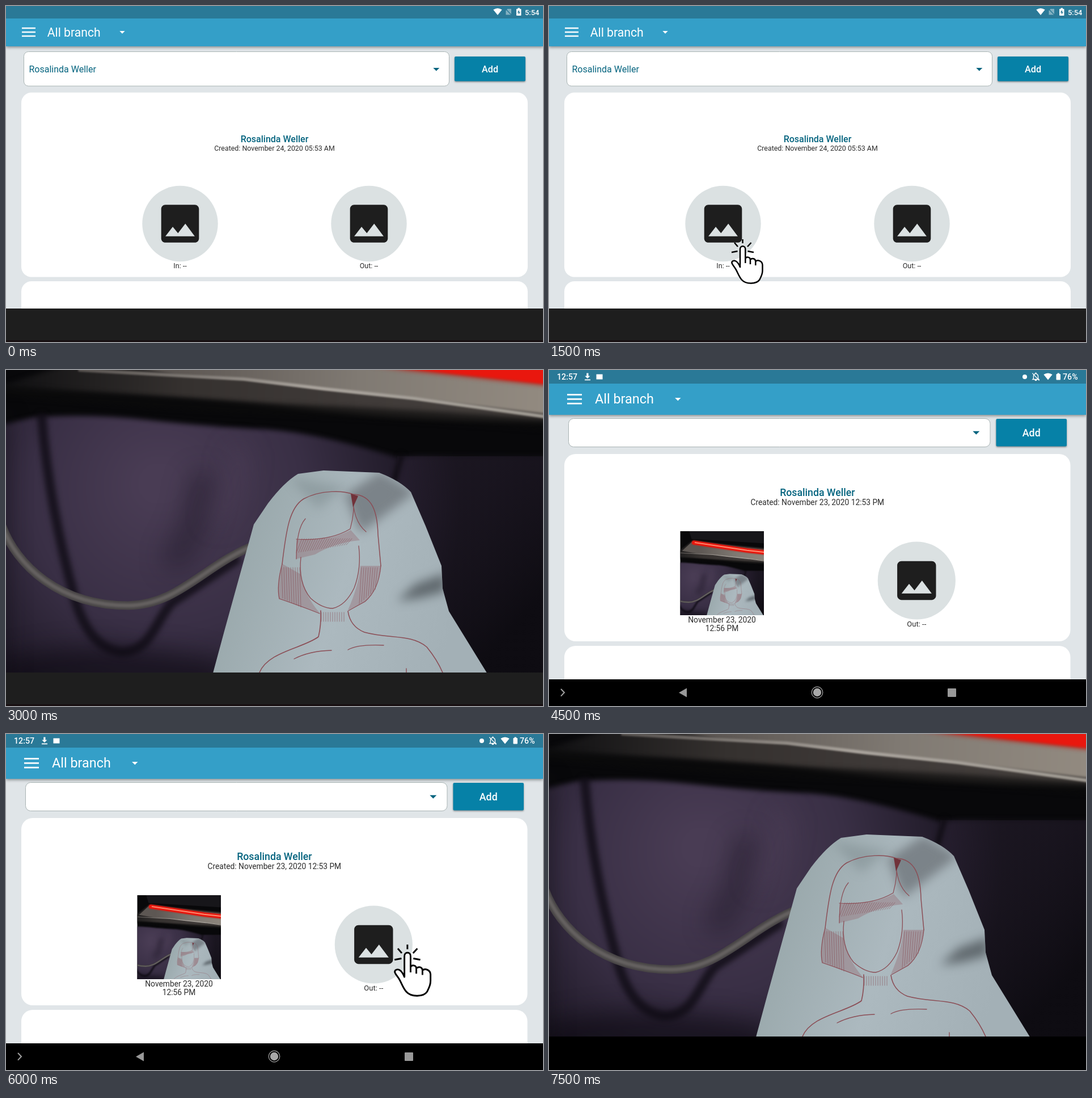
An HTML page with a canvas that plays this animation: 947x592 px, repeating every 8000 ms.

```html
<!DOCTYPE html>
<html lang="en">
<head>
<meta charset="utf-8">
<title>Branch check-in</title>
<style>
html, body { margin: 0; width: 100%; height: 100%; overflow: hidden; background: #000; }
canvas { display: block; width: 947px; height: 592px; }
</style>
</head>
<body>
<canvas id="stage" width="947" height="592"></canvas>
<script>
const W = 947, H = 592, LOOP = 8000, STEP = 1500;
const ctx = document.getElementById('stage').getContext('2d');
const PERSON = 'Rosalinda Weller';
const INK = '#2c2c2c', TEAL = '#05647f', DARK = '#1e1e1e';

const pictureIcon = new Path2D('M21 19V5c0-1.1-.9-2-2-2H5c-1.1 0-2 .9-2 2v14c0 1.1.9 2 2 2h14c1.1 0 2-.9 2-2zM8.5 13.5l2.5 3.01L14.5 12l4.5 6H5l3.5-4.5z');
const handShape = new Path2D('M16 49V17.5C16 10.5 25.3 10.5 25.3 17.5V34C27 30 33.8 31 34 36C37 32.5 43 34 43.3 39C47 35.5 55 38 55.5 45V55C55.5 63 52 67 50.5 71C45 79.5 26 79.5 19 71.5C14 66 12 59 8.5 53C6 48.5 3 46 1.5 42C.8 38.5 5 36.5 8.5 38.5C12 40.5 14 44 16 49Z');
const handLines = new Path2D('M25.3 33V42M34 36V44M43.3 39V46M20.5 0V7M6 6L12 13M35.5 6L29 13M1 23L11.5 21M29.5 21L40 23');
const bellIcon = new Path2D('M12 22c1.1 0 2-.9 2-2h-4a2 2 0 0 0 2 2zM6 17V11c0-3 1.6-5.6 4.5-6.3V4a1.5 1.5 0 0 1 3 0v.7C16.4 5.4 18 8 18 11v6l2 2H4z');

function rect(x, y, w, h, fill) {
  ctx.fillStyle = fill;
  ctx.fillRect(x, y, w, h);
}

function round(x, y, w, h, r, fill, stroke) {
  ctx.beginPath();
  ctx.roundRect(x, y, w, h, r);
  ctx.fillStyle = fill;
  ctx.fill();
  if (stroke) {
    ctx.strokeStyle = stroke;
    ctx.lineWidth = 1;
    ctx.stroke();
  }
}

function disc(x, y, r, fill) {
  ctx.beginPath();
  ctx.arc(x, y, r, 0, Math.PI * 2);
  ctx.fillStyle = fill;
  ctx.fill();
}

function fillPath(d, fill) {
  ctx.fillStyle = fill;
  ctx.fill(new Path2D(d));
}

function strokePath(d, color, width) {
  ctx.strokeStyle = color;
  ctx.lineWidth = width;
  ctx.stroke(new Path2D(d));
}

function text(str, x, y, size, color, weight = 400, align = 'left') {
  ctx.font = `${weight} ${size}px Roboto, sans-serif`;
  ctx.textAlign = align;
  ctx.fillStyle = color;
  ctx.fillText(str, x, y);
}

function caret(x, y, w, color) {
  fillPath(`M${x - w / 2} ${y}h${w}l${-w / 2} ${w / 2}z`, color);
}

function withShadow(blur, dy, alpha, draw) {
  ctx.save();
  ctx.shadowColor = `rgba(0,0,0,${alpha})`;
  ctx.shadowBlur = blur;
  ctx.shadowOffsetY = dy;
  draw();
  ctx.restore();
}

function gradient(x0, y0, x1, y1, ...colors) {
  const g = ctx.createLinearGradient(x0, y0, x1, y1);
  colors.forEach((c, i) => g.addColorStop(i / (colors.length - 1), c));
  return g;
}

function wifi(x, y) {
  fillPath(`M${x - 7.7} ${y - 3.6}Q${x} ${y - 8.6} ${x + 7.7} ${y - 3.6}L${x} ${y + 6}z`, '#fff');
}

function placeholder(x, y, r, scale) {
  disc(x, y, r, '#dbe1e2');
  ctx.save();
  ctx.translate(x, y);
  ctx.scale(scale, scale);
  ctx.translate(-12, -12);
  ctx.fillStyle = DARK;
  ctx.fill(pictureIcon, 'evenodd');
  ctx.restore();
}

function hand(x, y, scale) {
  ctx.save();
  ctx.translate(x, y);
  ctx.scale(scale, scale);
  ctx.lineWidth = 2.5;
  ctx.lineCap = 'butt';
  ctx.lineJoin = 'round';
  ctx.strokeStyle = '#000';
  ctx.fillStyle = '#fff';
  ctx.fill(handShape);
  ctx.stroke(handShape);
  ctx.stroke(handLines);
  ctx.restore();
}

function chrome(bar, tool, menu, title, pick) {
  rect(0, 0, W, H, '#e0e5e8');
  withShadow(5, 2, .4, () => rect(0, bar, W, tool - bar, '#349fc8'));
  rect(0, 0, W, bar, '#2a7997');
  for (let i = -1; i < 2; i++)
    rect(menu.x, menu.y + i * menu.gap - menu.h / 2, menu.w, menu.h, '#fff');
  text('All branch', title.x, title.y, title.size, '#fff');
  caret(pick.x, pick.y, pick.w, '#fff');
}

function addButton(x, y, w, h, size, base) {
  withShadow(3, 1.5, .4, () => round(x, y, w, h, 2, '#0681a7'));
  text('Add', x + w / 2, base, size, '#fff', 500, 'center');
}

function emptyScreen() {
  chrome(22, 71, { x: 28, y: 46, gap: 7, w: 24, h: 2.4 }, { x: 72.7, y: 53.5, size: 21.2 }, { x: 205, y: 44, w: 9.4 });
  wifi(867, 10);
  ctx.save();
  ctx.globalAlpha = .42;
  fillPath('M884.5 5H891V15.5H881.5V8z', '#fff');
  ctx.restore();
  strokePath('M880.5 4.5L892 16.5', '#2a7997', 1.5);
  round(900, 5, 8.5, 12, 1, '#fff');
  rect(902.5, 3.5, 3.5, 2, '#fff');
  fillPath('M905 7l-3.3 4.6h2.2V15l3-4.6h-2z', '#2a7997');
  text('5:54', 915, 16, 12.9, '#fff', 500);

  round(31.5, 80.5, 750, 60.5, 8, '#fff', '#a9b4b4');
  text(PERSON, 40.5, 116.6, 16, TEAL);
  caret(758.8, 109, 11, TEAL);
  addButton(791, 89, 125, 43.5, 16.2, 116.7);

  round(27, 152.5, 893, 325, 18, '#fff');
  round(27, 485, 893, 100, 18, '#fff');
  text(PERSON, 473.5, 239.7, 16, TEAL, 500, 'center');
  text('Created: November 24, 2020 05:53 AM', 473.5, 255.3, 12.42, INK, 400, 'center');
  placeholder(307, 383.5, 66.7, 3.7);
  placeholder(640, 383.5, 66.7, 3.7);
  text('In: --', 307, 462, 12.5, INK, 400, 'center');
  text('Out: --', 640, 462, 12.5, INK, 400, 'center');
  bottomBar();
}

function bottomBar() {
  rect(0, 533, W, 59, DARK);
  rect(0, 589, W, 3, '#170f11');
}

function filledScreen() {
  chrome(24, 79, { x: 32, y: 51.3, gap: 7.8, w: 26, h: 2.7 }, { x: 81, y: 59.4, size: 23.4 }, { x: 227.3, y: 49, w: 10.4 });
  text('12:57', 14, 17.2, 14.2, '#fff', 500);
  fillPath('M66.3 5.5h3.2v5h3L67.9 15l-4.6-4.5h3zM63 16.5h10v1.7H63z', '#fff');
  rect(83.5, 7.5, 11, 9, '#fff');
  disc(839, 12, 4, '#fff');
  ctx.save();
  ctx.translate(850.3, 3.6);
  ctx.scale(.68, .68);
  ctx.lineWidth = 2;
  ctx.strokeStyle = '#fff';
  ctx.stroke(bellIcon);
  strokePath('M3 3L21 22', '#fff', 2);
  ctx.restore();
  wifi(880, 11.5);
  round(894.5, 7, 7.5, 10.5, 1, '#fff');
  rect(896.5, 5.5, 3.5, 2, '#fff');
  text('76%', 906, 17.2, 14.2, '#fff', 500);

  round(34.5, 85.5, 743.5, 50, 9, '#fff', '#a9b4b4');
  caret(753.3, 107.7, 12, TEAL);
  addButton(788.5, 86, 124.5, 48.5, 17.8, 117.1);

  round(27, 148, 892.5, 330, 20, '#fff');
  round(27, 486, 892.5, 100, 20, '#fff');
  text(PERSON, 473.3, 222, 17.7, TEAL, 500, 'center');
  text('Created: November 23, 2020 12:53 PM', 473.3, 238.4, 13.78, INK, 400, 'center');
  thumbnail();
  text('November 23, 2020', 305, 444.7, 13.8, INK, 400, 'center');
  text('12:56 PM', 305, 460.3, 13.8, INK, 400, 'center');
  placeholder(648.3, 371, 68.6, 3.8);
  text('Out: --', 648.3, 452, 13, INK, 400, 'center');
  navBar();
}

function navBar() {
  rect(0, 545, W, 47, '#000');
  strokePath('M21 562l6 6.3l-6 6.3', '#a0a0a0', 2);
  fillPath('M229 568.5L243 560.5V576.5z', '#999');
  disc(473, 568, 7.2, '#a8a8a8');
  ctx.beginPath();
  ctx.arc(473, 568, 9.8, 0, Math.PI * 2);
  ctx.strokeStyle = '#a8a8a8';
  ctx.lineWidth = 1.2;
  ctx.stroke();
  round(703, 561, 15, 15, 1, '#999');
}

function soft(px, draw) {
  ctx.save();
  ctx.filter = `blur(${px}px)`;
  draw();
  ctx.restore();
}

// Simplified photo; k is the scale, so that blur radii shrink with it.
function photo(k) {
  ctx.save();
  ctx.lineCap = 'round';
  rect(-10, -200, 970, 740, '#08080a');
  cloth(k);
  wall(k);
  const wire = 'M-8 272C18 345 95 415 215 415C300 414 345 350 428 313';
  strokePath(wire, '#464344', 15);
  soft(2 * k, () => strokePath(wire, '#686463', 7));
  sheet(k);
  ctx.restore();
}

function cloth(k) {
  const tone = ctx.createRadialGradient(270, 200, 30, 300, 240, 500);
  tone.addColorStop(0, '#493c54');
  tone.addColorStop(.45, '#392f45');
  tone.addColorStop(.8, '#211b29');
  tone.addColorStop(1, '#121016');
  soft(4 * k, () => fillPath('M-20 100L45 84Q140 76 250 88T450 104T690 154L730 151L960 152V555H-20z', tone));
  rect(690, 152, 260, 390, gradient(690, 150, 947, 400, 'rgba(48,37,58,.3)', 'rgba(12,10,16,.7)'));
  soft(22 * k, () => {
    strokePath('M345 200Q340 270 300 330', 'rgba(20,15,28,.38)', 46);
    strokePath('M410 150Q410 210 375 255', 'rgba(88,72,98,.3)', 36);
    strokePath('M-20 550Q150 500 360 545', 'rgba(12,9,17,.6)', 70);
    strokePath('M-20 100V540', 'rgba(12,10,16,.5)', 40);
  });
  soft(5 * k, () => {
    strokePath('M63 84Q76 240 122 405Q148 492 205 497C255 495 262 445 292 410T405 335', 'rgba(15,12,20,.8)', 17);
    strokePath('M697 152L685 195', '#0a080c', 7);
  });
}

function wall(k) {
  soft(4 * k, () => {
    fillPath('M-10 28L140 -20L240 -95L960 -25V92Q700 88 500 66T-10 35z', gradient(0, 0, 947, 40, '#101012', '#35312f', '#403b39', '#45403d'));
    strokePath('M-10 36Q300 62 500 70T960 96', 'rgba(12,11,12,.65)', 20);
  });
  soft(2 * k, () => fillPath('M160 -15L240 -88L960 -10V78L720 50L560 33L420 16L300 8z', gradient(300, 0, 947, 30, '#5d5753', '#807a73', '#928a80')));
  soft(1.5 * k, () => strokePath('M130 0L310 10L420 16L560 33L720 50L950 82', gradient(130, 0, 947, 60, '#585350', '#aaa49d', '#9f9a92'), 6));
  soft(4 * k, () => strokePath('M260 -85L705 -19L960 9', '#b52a20', 38));
  soft(2 * k, () => {
    strokePath('M260 -85L705 -19L960 9', '#e9170e', 33);
    if (k < 1) strokePath('M270 -85L705 -20L960 8', '#ff8d72', 9);
  });
  soft(3 * k, () => fillPath('M220 -180H960V-72L240 -116z', '#17161a'));
}

function sheet(k) {
  const paper = new Path2D('M362 545L385 460L421 330L437 272L462 235Q490 198 515 183L560 177L658 181Q695 195 714 215L740 275L768 345L770 385L781 425L855 545z');
  ctx.fillStyle = gradient(400, 290, 800, 420, '#98a7aa', '#acb9bf', '#a3b0b6');
  ctx.fill(paper);
  ctx.save();
  ctx.clip(paper);
  soft(9 * k, () => {
    fillPath('M500 190L600 205L550 245z', 'rgba(105,115,120,.3)');
    fillPath('M598 220L625 288L722 215L660 178z', 'rgba(84,88,94,.55)');
    fillPath('M690 407L722 377L775 358V390L730 402z', 'rgba(60,66,72,.65)');
  });
  ctx.restore();
  sketch();
}

function hatch(x0, x1, y0, y1, slant, bow = 0) {
  for (let x = x0; x <= x1; x += 4) {
    const end = y1 + bow * (x - x0) / (x1 - x0);
    strokePath(`M${x} ${y0}L${x + slant} ${end}`, 'rgba(130,66,74,.5)', 1);
  }
}

// Faceless outline of the drawn figure.
function sketch() {
  const pen = '#8b4d55', wash = 'rgba(142,88,96,.32)';
  fillPath('M488 342Q478 380 482 403Q515 416 553 428Q525 395 520 360z', wash);
  fillPath('M625 345L661 345Q655 385 634 408L603 423Q622 380 625 345z', wash);
  fillPath('M512 298Q565 304 608 282L624 300Q580 304 545 325L512 333z', wash);
  hatch(486, 518, 348, 402, 2, 16);
  hatch(627, 655, 348, 412, -4, -25);
  hatch(556, 598, 427, 443, 0);
  hatch(522, 610, 297, 322, -10, -14);
  strokePath('M487 342C494 282 500 242 525 227C555 211 595 212 612 219C646 220 655 250 656 290L661 345', pen, 1.5);
  strokePath('M487 342Q477 380 482 403Q515 414 553 429M661 345Q657 388 633 408L604 424', pen, 1.3);
  strokePath('M520 330Q515 375 537 402Q557 420 576 420Q599 415 614 384Q627 350 622 310', pen, 1.3);
  strokePath('M612 219Q616 248 607 280Q570 302 512 298M612 220Q611 265 635 285M528 262Q512 280 512 333', pen, 1.2);
  fillPath('M608 218L621 222L612 242z', '#71323a');
  strokePath('M555 424Q556 450 551 470C525 490 462 496 447 533M603 425Q607 452 632 462C675 474 715 465 742 488Q760 510 770 533', pen, 1.6);
  strokePath('M508 509Q535 495 574 494M603 493Q620 483 666 485M706 526V533', pen, 1.4);
}

function thumbnail() {
  ctx.save();
  ctx.beginPath();
  ctx.rect(231.5, 284, 147.5, 148);
  ctx.clip();
  ctx.translate(201, 322);
  ctx.scale(.21, .21);
  photo(.21);
  ctx.restore();
}

function photoScreen(bar) {
  photo(1);
  bar();
}

const scenes = [
  emptyScreen,
  () => { emptyScreen(); hand(321, 411, 1); },
  () => photoScreen(bottomBar),
  filledScreen,
  () => { filledScreen(); hand(684, 371, 1.165); },
  () => photoScreen(() => rect(0, 533, W, 59, '#000'))
];

let shown = -1;
const start = performance.now();

function tick() {
  const index = Math.floor((performance.now() - start) % LOOP / STEP);
  if (index !== shown) {
    shown = index;
    scenes[index]();
  }
  requestAnimationFrame(tick);
}
tick();
</script>
</body>
</html>
```
